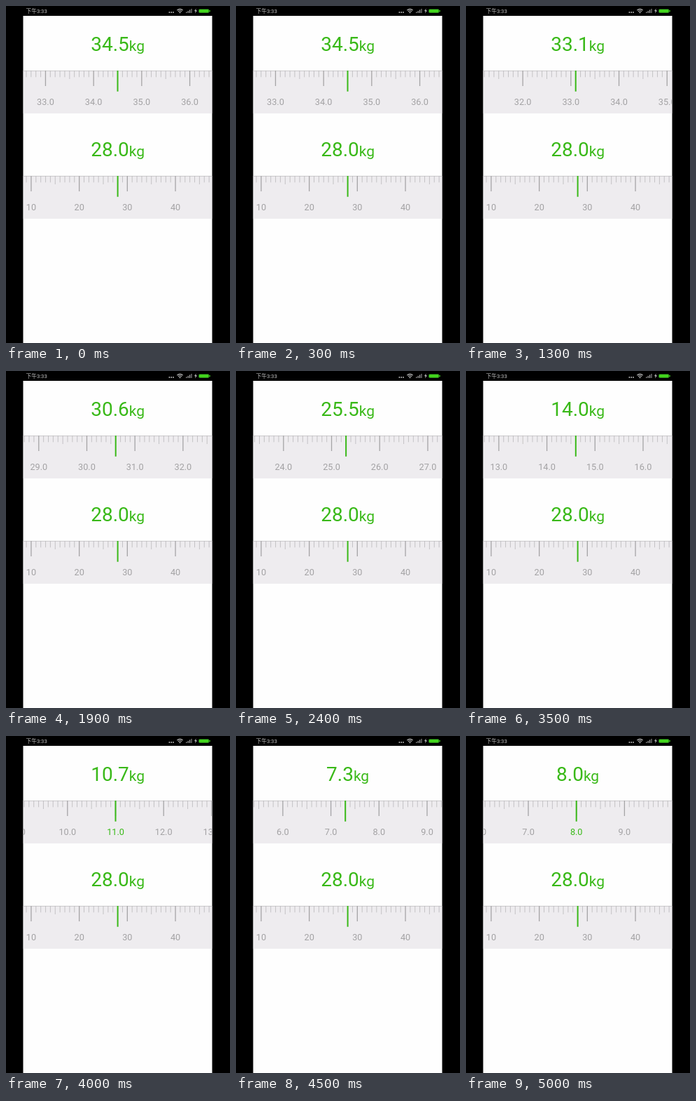
An HTML page that plays this animation: 320x480 px, repeating every 5.1 s.

```html
<!DOCTYPE html>
<html lang="zh">
<head>
<meta charset="utf-8">
<title>Weight ruler</title>
<style>
  html, body { margin: 0; width: 100%; height: 100%; overflow: hidden; background: #000; }
  svg { display: block; width: 100vw; height: 100vh; }
  text { font-family: Roboto, "Noto Sans CJK SC", "Noto Sans CJK", sans-serif; }
  .value { font-size: 28px; fill: #39b918; text-anchor: middle; }
  .unit { font-size: 21px; }
  .label { font-size: 12.7px; fill: #a3a2a4; text-anchor: middle; }
  .label.on { fill: #39b918; }
  .tick { stroke: #b9b8ba; stroke-width: .8; }
  .tick.major { stroke: #a5a4a6; stroke-width: 1.3; }
  .pointer { stroke: #39b918; stroke-width: 2; }
</style>
</head>
<body>
<svg viewBox="0 0 320 480">
  <defs>
    <clipPath id="screen"><rect x="24.5" y="14" width="270" height="466"/></clipPath>
  </defs>
  <rect width="320" height="480" fill="#000"/>
  <rect x="24.5" y="14" width="270" height="466" fill="#fefefe"/>
  <g id="status" fill="#c4c4c4">
    <text x="28.5" y="10.2" font-size="7.7">下午3:33</text>
    <circle cx="233.4" cy="9" r=".9"/>
    <circle cx="236.2" cy="9" r=".9"/>
    <circle cx="239" cy="9" r=".9"/>
    <g fill="none" stroke="#c4c4c4" stroke-width="1.1">
      <path d="M244.3 6.2Q248.5 2.6 252.7 6.2M245.8 7.9Q248.5 5.6 251.2 7.9"/>
      <path d="M257.8 10V8.4M260.2 10V7M262.6 10V5.6"/>
      <path d="M265 10V4" stroke="#999"/>
    </g>
    <circle cx="248.5" cy="9.3" r="1"/>
    <path d="M271.6 3.4L269 7.3H270.8L270 10.4L273 6.2H271.1Z"/>
    <rect x="275" y="4.2" width="15.4" height="5.8" rx="1.8" fill="#24701a"/>
    <rect x="276" y="5" width="13.4" height="4.2" rx="1" fill="#42d51d"/>
    <rect x="290.4" y="6" width="1.3" height="2.2" rx=".5" fill="#42d51d"/>
  </g>
  <g id="rulers" clip-path="url(#screen)"></g>
</svg>
<script>
const LOOP = 5100, STEP = 100;
const TICK = 6.87;
const LEFT = 5, RIGHT = 294;

// step, tick under the pointer, pointer x, displayed value
const KEYS = [
  [0, 34.5, 159.5, 34.5],
  [12, 34.5, 159.5, 34.5],
  [13, 33.1, 156.7, 33.1],
  [19, 30.6, 156.7, 30.6],
  [29, 20.0, 157.6, 20.4],
  [35, 14.6, 156.8, 14.0],
  [45, 7.3, 156.2, 7.3],
  [50, 8.0, 157.7, 8.0]
];

const line = (cls, x, y, len) =>
  `<line class="${cls}" x1="${x}" x2="${x}" y1="${y}" y2="${y + len}"/>`;

// current and every tick index count in tenths of a labelled interval
function ruler(top, current, px, value, format) {
  let out = `<text class="value" x="159.6" y="${top - 28}">${value.toFixed(1)}<tspan class="unit">kg</tspan></text>
    <rect x="24.5" y="${top}" width="270" height="61" fill="#eeecef"/>
    <path d="M24.5 ${top + .4}H294.5" stroke="#c2c1c3" stroke-width=".8"/>`;
  const first = Math.max(0, Math.ceil(current + (LEFT - px) / TICK));
  const last = Math.floor(current + (RIGHT - px) / TICK);
  for (let i = first; i <= last; i++) {
    const x = +(px + (i - current) * TICK).toFixed(2);
    const major = i % 10 === 0;
    out += line(major ? "tick major" : "tick", x, top, major ? 22 : i % 5 ? 9.3 : 12);
    if (major) {
      out += `<text class="label${i === current ? " on" : ""}" x="${x}" y="${top + 49}">${format(i)}</text>`;
    }
  }
  return out + line("pointer", px, top, 29.7);
}

function stateAt(step) {
  const n = KEYS.findIndex(k => k[0] >= step);
  const b = KEYS[n], a = KEYS[Math.max(0, n - 1)];
  const f = b === a ? 0 : (step - a[0]) / (b[0] - a[0]);
  return [1, 2, 3].map(c => a[c] + (b[c] - a[c]) * f);
}

const rulers = document.getElementById("rulers");
let shown = -1;

function draw(time) {
  const step = Math.floor(time % LOOP / STEP);
  if (step === shown) return;
  shown = step;
  const [tick, px, value] = stateAt(step);
  rulers.innerHTML =
    ruler(92, Math.round(tick * 10), px, value, i => (i / 10).toFixed(1)) +
    ruler(242, 28, 159.6, 28, i => i);
}

const start = performance.now();
function loop() {
  draw(performance.now() - start);
  requestAnimationFrame(loop);
}
loop();
</script>
</body>
</html>
```
